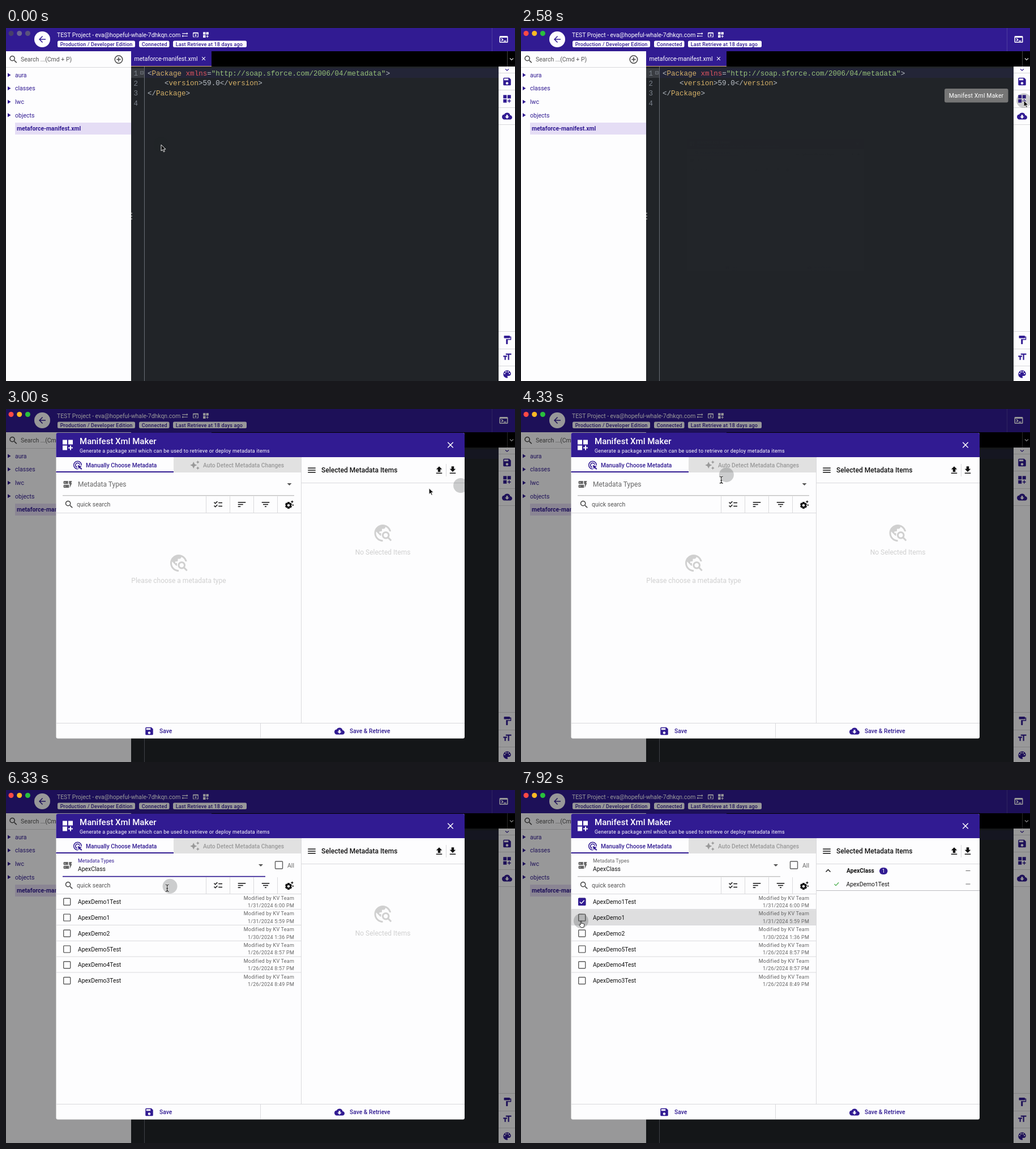
Animation, 899 px wide and 623 px high, one loop 8 s. Source, as an HTML page:

```html
<!DOCTYPE html>
<html lang="en">
<head>
<meta charset="utf-8">
<title>Metadata editor</title>
<style>
html, body { margin: 0; width: 100%; height: 100%; overflow: hidden; background: #212428; }
svg { display: block; }
text { font-family: Roboto, sans-serif; white-space: pre; }
.m { font-weight: 500; }
.b { font-weight: 700; }
.cap { letter-spacing: .22px; }
.code { font-family: "Liberation Mono", monospace; }
.end { text-anchor: end; }
.mid { text-anchor: middle; }
#menu { filter: drop-shadow(0 1px 3px rgba(0,0,0,.35)); }
</style>
</head>
<body>
<svg id="stage" width="899" height="623" viewBox="0 0 899 623"></svg>
<script>
const INK = '#311b92', PAPER = '#fdfdfe', GREY = '#666', RULE = '#d9d9dc', PALE = '#d0d0d0';
const TITLE = 'Manifest Xml Maker';

const ICONS = {
  search: 'M15.5 14h-.79l-.28-.27A6.47 6.47 0 0 0 16 9.5 6.5 6.5 0 1 0 9.5 16c1.61 0 3.09-.59 4.23-1.57l.27.28v.79l5 4.99L20.49 19l-4.99-5zm-6 0C7.01 14 5 11.99 5 9.5S7.01 5 9.5 5 14 7.01 14 9.5 11.99 14 9.5 14z',
  save: 'M17 3H5a2 2 0 0 0-2 2v14a2 2 0 0 0 2 2h14a2 2 0 0 0 2-2V7l-4-4zm-5 16c-1.66 0-3-1.34-3-3s1.34-3 3-3 3 1.34 3 3-1.34 3-3 3zm3-10H5V5h10v4z',
  widgets: 'M3 11h8V3H3v8zM3 21h8v-8H3v8zM13 3v8h8V3h-8zM18 13h-2v3h-3v2h3v3h2v-3h3v-2h-3v-3z',
  cloud: 'M19.35 10.04A7.49 7.49 0 0 0 12 4C9.11 4 6.6 5.64 5.35 8.04A6 6 0 0 0 0 14c0 3.31 2.69 6 6 6h13c2.76 0 5-2.24 5-5 0-2.64-2.05-4.78-4.65-4.96zM17 13l-5 5-5-5h3V9h4v4h3z',
  paint: 'M18 4V3c0-.55-.45-1-1-1H5c-.55 0-1 .45-1 1v4c0 .55.45 1 1 1h12c.55 0 1-.45 1-1V6h1v4H9v11c0 .55.45 1 1 1h2c.55 0 1-.45 1-1v-9h8V4h-3z',
  size: 'M9 4v3h5v12h3V7h5V4H9zm-6 8h3v7h3v-7h3V9H3v3z',
  palette: 'M12 3a9 9 0 0 0 0 18c.83 0 1.5-.67 1.5-1.5 0-.39-.15-.74-.39-1.01-.23-.26-.38-.61-.38-.99 0-.83.67-1.5 1.5-1.5H16c2.76 0 5-2.24 5-5 0-4.42-4.03-8-9-8zm-5.5 9a1.5 1.5 0 1 1 0-3 1.5 1.5 0 0 1 0 3zm3-4a1.5 1.5 0 1 1 0-3 1.5 1.5 0 0 1 0 3zm5 0a1.5 1.5 0 1 1 0-3 1.5 1.5 0 0 1 0 3zm3 4a1.5 1.5 0 1 1 0-3 1.5 1.5 0 0 1 0 3z',
  back: 'M20 11H7.83l5.59-5.59L12 4l-8 8 8 8 1.41-1.41L7.83 13H20v-2z',
  terminal: 'M20 4H4a2 2 0 0 0-2 2v12a2 2 0 0 0 2 2h16a2 2 0 0 0 2-2V6a2 2 0 0 0-2-2zm0 14H4V8h16v10zm-2-1h-6v-2h6v2zM7.5 17l-1.41-1.41L8.67 13l-2.59-2.59L7.5 9l4 4-4 4z',
  add: 'M13 7h-2v4H7v2h4v4h2v-4h4v-2h-4V7zm-1-5a10 10 0 1 0 0 20 10 10 0 0 0 0-20zm0 18a8 8 0 1 1 0-16 8 8 0 0 1 0 16z',
  swap: 'M22 8l-4-4v3H3v2h15v3l4-4zM2 16l4 4v-3h15v-2H6v-3l-4 4z',
  browser: 'M19 4H5a2 2 0 0 0-2 2v12c0 1.1.9 2 2 2h4v-2H5V8h14v10h-4v2h4a2 2 0 0 0 2-2V6a2 2 0 0 0-2-2zm-7 6l-4 4h3v6h2v-6h3l-4-4z',
  close: 'M19 6.41L17.59 5 12 10.59 6.41 5 5 6.41 10.59 12 5 17.59 6.41 19 12 13.41 17.59 19 19 17.59 13.41 12z',
  click: 'M11.71 17.99A6 6 0 0 1 6 12c0-3.31 2.69-6 6-6 3.22 0 5.84 2.53 5.99 5.71l-2.1-.63a4 4 0 1 0-4.81 4.81l.63 2.1zM22 12c0 .3-.01.6-.04.9l-1.97-.59c.01-.1.01-.21.01-.31 0-4.42-3.58-8-8-8s-8 3.58-8 8 3.58 8 8 8c.1 0 .21 0 .31-.01l.59 1.97c-.3.03-.6.04-.9.04-5.52 0-10-4.48-10-10S6.48 2 12 2s10 4.48 10 10zm-3.77 4.26L22 15l-10-3 3 10 1.26-3.77 4.27 4.27 1.98-1.98-4.28-4.26z',
  sparkle: 'M19 9l1.25-2.75L23 5l-2.75-1.25L19 1l-1.25 2.75L15 5l2.75 1.25L19 9zm-7.5.5L9 4 6.5 9.5 1 12l5.5 2.5L9 20l2.5-5.5L17 12l-5.5-2.5zM19 15l-1.25 2.75L15 19l2.75 1.25L19 23l1.25-2.75L23 19l-2.75-1.25L19 15z',
  form: 'M17 20v-9h-2V4h7l-2 5h2l-5 11zM15 13v7H4c-1.1 0-2-.9-2-2v-3c0-1.1.9-2 2-2h11zm-8.75 2.75h-1.5v1.5h1.5v-1.5zM13 4v7H4c-1.1 0-2-.9-2-2V6c0-1.1.9-2 2-2h9zM6.25 6.75h-1.5v1.5h1.5v-1.5z',
  checklist: 'M22 7h-9v2h9V7zm0 8h-9v2h9v-2zM5.54 11L2 7.46l1.41-1.41 2.12 2.12 4.24-4.24 1.41 1.41L5.54 11zm0 8L2 15.46l1.41-1.41 2.12 2.12 4.24-4.24 1.41 1.41L5.54 19z',
  sort: 'M3 18h6v-2H3v2zM3 6v2h18V6H3zm0 7h12v-2H3v2z',
  filter: 'M10 18h4v-2h-4v2zM3 6v2h18V6H3zm3 7h12v-2H6v2z',
  gear: 'M17.41 6.59L15 5.5l2.41-1.09L18.5 2l1.09 2.41L22 5.5l-2.41 1.09L18.5 9l-1.09-2.41zm3.87 6.13L20.5 11l-.78 1.72-1.72.78 1.72.78.78 1.72.78-1.72L23 13.5l-1.72-.78zm-5.04 1.65l1.94 1.47-2.5 4.33-2.24-.94c-.2.13-.42.26-.64.37l-.3 2.4h-5l-.3-2.41c-.22-.11-.43-.23-.64-.37l-2.24.94-2.5-4.33 1.94-1.47v-.73l-1.94-1.47 2.5-4.33 2.24.94c.2-.13.42-.26.64-.37L7.5 6h5l.3 2.41c.22.11.43.23.64.37l2.24-.94 2.5 4.33-1.94 1.47v.73zM13 14c0-1.66-1.34-3-3-3s-3 1.34-3 3 1.34 3 3 3 3-1.34 3-3z',
  menu: 'M3 18h18v-2H3v2zm0-5h18v-2H3v2zm0-7v2h18V6H3z',
  upload: 'M5 20h14v-2H5v2zM5 10h4v6h6v-6h4l-7-7-7 7z',
  download: 'M19 9h-4V3H9v6H5l7 7 7-7zM5 18v2h14v-2H5z',
  explore: 'M19.3 16.9c.4-.7.7-1.5.7-2.4 0-2.5-2-4.5-4.5-4.5S11 12 11 14.5s2 4.5 4.5 4.5c.9 0 1.7-.3 2.4-.7l3.2 3.2 1.4-1.4-3.2-3.2zm-3.8.1c-1.4 0-2.5-1.1-2.5-2.5s1.1-2.5 2.5-2.5 2.5 1.1 2.5 2.5-1.1 2.5-2.5 2.5zM12 20v2C6.48 22 2 17.52 2 12S6.48 2 12 2c4.84 0 8.87 3.44 9.8 8h-2.07A8 8 0 0 0 15 4.59V5c0 1.1-.9 2-2 2h-2v2c0 .55-.45 1-1 1H8v2h2v3H9l-4.79-4.79C4.08 10.79 4 11.38 4 12c0 4.41 3.59 8 8 8z'
};

const rect = (x, y, w, h, fill, more = '') =>
  `<rect x="${x}" y="${y}" width="${w}" height="${h}" fill="${fill}" ${more}/>`;
const text = (x, y, size, str, fill = INK, cls = '', more = '') =>
  `<text x="${x}" y="${y}" font-size="${size}" fill="${fill}" class="${cls}" ${more}>${str}</text>`;
const icon = (name, x, y, fill = INK, size = 18) =>
  `<path transform="translate(${x - size / 2} ${y - size / 2}) scale(${size / 24})" d="${ICONS[name]}" fill="${fill}"/>`;
const line = (d, color, width = 1, more = '') =>
  `<path d="${d}" fill="none" stroke="${color}" stroke-width="${width}" ${more}/>`;
const dot = (x, y, r, fill) => `<circle cx="${x}" cy="${y}" r="${r}" fill="${fill}"/>`;
const group = (id, body) => `<g id="${id}">${body}</g>`;
const span = (str, fill) => `<tspan fill="${fill}">${str}</tspan>`;
const each = (list, fn) => list.map(fn).join('');

// Main window
function header() {
  const pill = (x, w, str) => rect(x, 22.5, w, 11.5, PAPER, 'rx="2.5"') +
    text(x + 4.7, 31.5, 9, str, INK, 'm', 'letter-spacing=".17"');
  return rect(0, 0, 899, 41, INK) + dot(64, 20, 14, PAPER) + icon('back', 64, 20) +
    text(90, 15.5, 10.4, 'TEST Project - eva@hopeful-whale-7dhkqn.com', '#fff') +
    icon('swap', 316, 12, '#fff', 13) + icon('browser', 335, 12, '#fff', 13) + icon('widgets', 353, 12, '#fff', 13) +
    pill(91, 137, 'Production / Developer Edition') + pill(235, 53.5, 'Connected') +
    pill(295, 130, 'Last Retrieve at 18 days ago') +
    line('M858.5 0V41', '#4e3c9f') + icon('terminal', 879, 20, '#fff');
}

function sidebar() {
  return rect(0, 41, 221, 582, PAPER) + icon('search', 13, 55.5, '#444') +
    text(26, 59, 10.5, 'Search ...(Cmd + P)', '#555') + icon('add', 199, 55.5, '#444') +
    line('M0 69.5H221', RULE) +
    each(['aura', 'classes', 'lwc', 'objects'], (s, i) => {
      const y = 83 + i * 23.6;
      return `<path d="M3 ${y - 3.5}l5.5 3.5-5.5 3.5z" fill="${INK}"/>` + text(16, y + 3.7, 10.5, s);
    }) +
    rect(16, 167, 205, 21, '#e5ddf5') + text(19, 181, 10.4, 'metaforce-manifest.xml', INK, 'b');
}

function editor() {
  const tag = '#d6b168', mark = '#b9bfc6', str = '#98c379';
  const code = (x, y, body) => text(x, y, 12.53, body, mark, 'code');
  return rect(221, 41, 678, 27, '#000') + rect(221, 41, 142, 27, INK) + rect(221, 67, 142, 1, '#d6a878') +
    text(226.5, 58, 10.5, 'metaforce-manifest.xml', '#fff') + icon('close', 349, 54, '#fff', 11) +
    line('M885.5 41V68', '#444') + line('M890 53.5l3 3 3-3', '#ddd', 1.2) +
    rect(221, 68, 649, 555, '#212428') + rect(245, 71, 625, 17, '#232537') + rect(221, 71, 23, 17, '#393c41') +
    line('M244.5 68V623', '#686c74') +
    each([1, 2, 3, 4], n => text(233, 66.3 + n * 17.6, 12.53, n, '#7b828c', 'code end')) +
    line('M237.5 76.5h5v5h-5zM238.5 79h3', '#7b828c', .8) +
    code(250, 83.5, '&lt;' + span('Package', tag) + ' ' + span('xmlns', '#e0545f') + '=' +
      span('"http://soap.sforce.com/2006/04/metadata"', str) + '&gt;') +
    code(280, 101, '&lt;' + span('version', tag) + '&gt;59.0&lt;/' + span('version', tag) + '&gt;') +
    code(250, 118.5, '&lt;/' + span('Package', tag) + '&gt;') +
    each([327, 332, 337], y => dot(218, y, 1.2, '#888') + dot(222, y, 1.2, '#888'));
}

function toolbar() {
  return rect(870, 68, 29, 555, PAPER) + line('M882 72.5l3 2.5 3-2.5', INK, 1.2) +
    each([79.5, 109.5, 140.5, 170.5, 535.5, 566.5, 596.5], y => line(`M870 ${y}h29`, RULE)) +
    icon('save', 885, 94.5) + icon('widgets', 885, 125) + icon('cloud', 885, 155.5) +
    icon('paint', 885.5, 550.5) + icon('size', 885, 580.5) + icon('palette', 885, 611);
}

// Dialog
const TYPES = ['ApexClass', 'ApexComponent', 'ApexPage', 'ApexTrigger', 'ApprovalProcess', 'AssignmentRules',
  'AuraDefinitionBundle', 'CustomApplication', 'CustomField', 'CustomLabel', 'CustomObject', 'CustomPermission', 'CustomTab'];
const ITEMS = [['1Test', '31/2024 6:00'], ['1', '31/2024 5:59'], ['2', '30/2024 1:36'],
  ['5Test', '26/2024 8:57'], ['4Test', '26/2024 8:57'], ['3Test', '26/2024 8:49']];
const ROW = 27.85, OPTION = 35.42;

const box = (x, y, s = 12) => rect(x - s / 2, y - s / 2, s, s, 'none', 'stroke="#5c5c5c" stroke-width="1.4" rx="1"');

const itemRow = ([name, date], i) => {
  const y = 183 + i * ROW;
  return box(107.7, y + 14.3) + text(127, y + 18, 10.35, 'ApexDemo' + name, '#111') +
    text(509, y + 10.5, 9, 'Modified by KV Team', GREY, 'cap end') +
    text(509, y + 23.8, 9, `1/${date} PM`, GREY, 'cap end') +
    (i < 5 ? line(`M88.5 ${y + ROW - .3}H521`, RULE) : '');
};

function dialog() {
  return rect(88.5, 42, 721.5, 539.5, PAPER, 'rx="3"') +
    `<path d="M88.5 85V45q0-3 3-3H807q3 0 3 3V85z" fill="${INK}"/>` + icon('widgets', 109, 63.5, '#fff', 24) +
    text(130, 62, 15, TITLE, '#fff', 'm') +
    text(130, 77, 9, 'Generate a package xml which can be used to retrieve or deploy metadata items', '#fff', 'cap') +
    icon('close', 785, 63.5, '#fff') +
    rect(296, 85, 225, 27, '#e1e1e1') + rect(88.5, 110, 207.5, 2, INK) +
    icon('click', 126.5, 99) + text(141, 103, 10.25, 'Manually Choose Metadata', INK, 'm') +
    icon('sparkle', 333.5, 99, '#999') + text(348, 103, 10.25, 'Auto Detect Metadata Changes', '#999', 'm') +
    icon('form', 109, 133, GREY) + text(127, 137, 12, 'Metadata Types', GREY, '', 'id="label"') +
    '<path id="caret" fill="#555"/>' + '<rect id="under" x="100"/>' +
    group('chosen', text(127, 143, 10.4, 'ApexClass', '#111') + box(482, 132.5, 13) + text(497, 136.5, 10.5, 'All', GREY)) +
    icon('search', 111.5, 168.5, '#444') + text(125, 172, 10.5, 'quick search', '#555') +
    line('M88.5 183.5H521M353.5 154V183M395.5 154V183M437.5 154V183M479.5 154V183', RULE) +
    icon('checklist', 374.5, 168.5, '#111') + icon('sort', 416.5, 168.5, '#111') +
    icon('filter', 458.5, 168.5, '#111') + icon('gear', 500.5, 168.5, '#111') +
    group('hint', icon('explore', 305, 272, PALE, 36) +
      text(305, 307, 12, 'Please choose a metadata type', PALE, 'mid')) +
    group('rows', rect(88.5, 0, 432.5, ROW, '#000', 'id="hover" opacity=".12"') + each(ITEMS, itemRow)) +
    group('tick', rect(101, 190.6, 13.4, 13.4, INK, 'rx="1.5"') + line('M103.8 197.5l2.8 2.8 5-5.6', '#fff', 1.4)) +
    line('M521.5 85V554', RULE) + line('M522 130.5H810', RULE) +
    icon('menu', 540, 108, '#111') + text(557, 112, 12, 'Selected Metadata Items', '#111', 'm') +
    icon('upload', 765, 108, '#111') + line('M777.5 97V119', RULE) + icon('download', 789, 108, '#111') +
    group('empty', icon('explore', 665.5, 219, PALE, 36) + text(665.5, 257, 12, 'No Selected Items', PALE, 'mid')) +
    group('picked', line('M538.5 144.5l4-4 4 4', '#111', 1.4) + text(575, 146, 10.3, 'ApexClass', '#111', 'b') +
      rect(633, 137, 14.5, 12, INK, 'rx="6"') + text(640.2, 146.2, 9, '1', '#fff', 'mid') +
      line('M553.5 166l2.6 2.6 5-5.4', '#4caf50', 1.3) + text(574.5, 169.5, 10.35, 'ApexDemo1Test', '#111') +
      line('M785.5 142.5h8M785.5 166h8', '#666', 1.2) + line('M522 177.5H810', '#bcbcc0')) +
    line('M88.5 554.5H810M449.5 555V581', RULE) +
    icon('save', 253, 568.5) + text(271, 572, 10.3, 'Save', INK, 'm') +
    icon('cloud', 589, 568.5) + text(607, 572, 10.3, 'Save &amp; Retrieve', INK, 'm') +
    group('menu', rect(100, 153, 409, 480, PAPER) + rect(100, 0, 409, OPTION, '#000', 'id="option" opacity=".15"') +
      each(TYPES, (s, i) => text(112, 175 + i * OPTION, 10.4, s, '#111')));
}

const CURSORS = {
  arrow: '<path d="M0 0v11l2.6-2.4 1.8 4 1.9-.8-1.8-3.9h3.6z" fill="#111" stroke="#fff" stroke-width=".9"/>',
  beam: each([['#fff', 2.6], ['#111', 1.1]], ([c, w]) =>
    line('M-3-6q3 0 3 2v8q0 2-3 2M3-6q-3 0-3 2M0 4q0 2 3 2M-1.5 1h3', c, w)),
  hand: '<path d="M-.8.8q.8-1.6 1.7 0v4q.9-.9 1.7 0 .9-.8 1.6.2 1-.6 1.5.6v3q0 3-3 3.2h-2q-1.6-.6-4-5 .4-1.6 2.5 0z" fill="#fff" stroke="#111" stroke-width=".9"/>'
};

const stage = document.getElementById('stage');
stage.innerHTML = header() + editor() + sidebar() + toolbar() +
  rect(0, 0, 899, 623, '#000', 'id="shade"') + group('dialog', dialog()) +
  group('tip', rect(748, 107, 112.5, 24.5, '#757575', 'rx="3"') + text(804, 123, 10.5, TITLE, '#fff', 'mid', 'letter-spacing=".15"')) +
  group('lights', each(['#ff4a45', '#fdb924', '#29c13d'], (c, i) => dot(9 + i * 14.7, 9.5, 4.5, c))) +
  '<circle id="halo" r="13" fill="#222426" opacity=".22"/>' +
  each(Object.keys(CURSORS), k => group(k, CURSORS[k]));

// Pointer path: time, x, y, cursor shown from that time on
const PATH = [
  [0, 274, 206, 'arrow'], [1000, 274, 206, 'beam'], [1300, 330, 200, 'beam'], [1750, 682, 122, 'beam'],
  [1830, 802, 112, 'beam'], [1920, 868, 122, 'arrow'], [2100, 886, 127, 'arrow'], [2420, 888, 128, 'arrow'],
  [2850, 888, 128, 'arrow'], [3330, 440, 165, 'arrow'], [3600, 190, 150, 'hand'], [3750, 160, 104, 'hand'],
  [4080, 372, 104, 'hand'], [4180, 372, 104, 'hand'], [4250, 366, 113, 'beam'], [4330, 354, 125, 'beam'],
  [4500, 318, 134, 'beam'], [4800, 312, 136, 'beam'], [5170, 300, 148, 'hand'], [5360, 290, 169, 'hand'],
  [5640, 291, 169, 'beam'], [5850, 294, 266, 'arrow'], [5940, 294, 266, 'arrow'], [6000, 297, 173, 'beam'],
  [6200, 295, 166, 'beam'], [6330, 285, 173, 'beam'], [6650, 190, 188, 'hand'], [7080, 109, 200, 'hand'],
  [7250, 107, 198, 'hand'], [7750, 107, 198, 'hand'], [7860, 106, 231, 'hand'], [8000, 106, 231, 'hand']];

const clamp = v => Math.max(0, Math.min(1, v));
const ramp = (t, a, b) => clamp((t - a) / (b - a));
const mix = (a, b, p) => a + (b - a) * p;

function pointer(t) {
  const i = Math.max(1, PATH.findIndex(k => k[0] > t)), a = PATH[i - 1], b = PATH[i];
  const p = ramp(t, a[0], b[0]);
  return { x: mix(a[1], b[1], p), y: mix(a[2], b[2], p), kind: a[3] };
}

const el = {};
stage.querySelectorAll('[id]').forEach(e => el[e.id] = e);
const show = (id, on) => el[id].style.display = on ? '' : 'none';
const fade = (id, v) => { show(id, v > 0); el[id].setAttribute('opacity', v); };
const set = (id, attrs) => { for (const k in attrs) el[id].setAttribute(k, attrs[k]); };

function draw(t) {
  const at = pointer(t), trail = pointer(Math.max(0, t - 60));
  const opening = ramp(t, 2580, 2855), floating = ramp(t, 4520, 4700);
  const focused = t >= 4520 && t < 7420, chosen = t >= 5640, listed = t >= 6170, checked = t >= 7420;
  const menu = ramp(t, 4540, 4740) * (1 - ramp(t, 5600, 5780));

  el.lights.setAttribute('style', t < 1000 ? 'filter:grayscale(1) brightness(.75);opacity:.65' : '');
  fade('tip', ramp(t, 2150, 2350) * (1 - ramp(t, 2600, 2880)));
  fade('shade', .4 * opening);
  fade('dialog', opening);
  set('dialog', { transform: `translate(449.3 311.7) scale(${mix(.43, 1, opening)}) translate(-449.3 -311.7)` });

  set('label', { y: mix(137, 128, floating), 'font-size': mix(12, 9, floating), fill: focused ? INK : GREY });
  set('under', { y: focused ? 151.8 : 152.3, width: chosen ? 358 : 409, height: focused ? 1.7 : 1, fill: focused ? INK : '#aaa' });
  const cx = chosen ? 450 : 500.5, flip = menu > 0 && !chosen ? -1 : 1;
  set('caret', { d: `M${cx - 4} ${133 - 2 * flip}h8l-4 ${4 * flip}z` });
  show('chosen', chosen);
  show('hint', !chosen);
  show('rows', listed);
  show('tick', checked);
  show('picked', checked);
  show('empty', !checked);

  const row = Math.floor((at.y - 183) / ROW);
  show('hover', row >= 0 && row < ITEMS.length && at.x > 89 && at.x < 521);
  set('hover', { y: 183.3 + row * ROW });
  fade('menu', menu);
  const option = Math.floor((at.y - 153) / OPTION);
  show('option', option >= 0);
  set('option', { y: 153 + option * OPTION });

  set('halo', { cx: trail.x, cy: trail.y });
  for (const k in CURSORS) show(k, k === at.kind);
  set(at.kind, { transform: `translate(${at.x} ${at.y})` });
}

function tick() {
  draw(performance.now() % 8000);
  requestAnimationFrame(tick);
}
tick();
</script>
</body>
</html>
```
